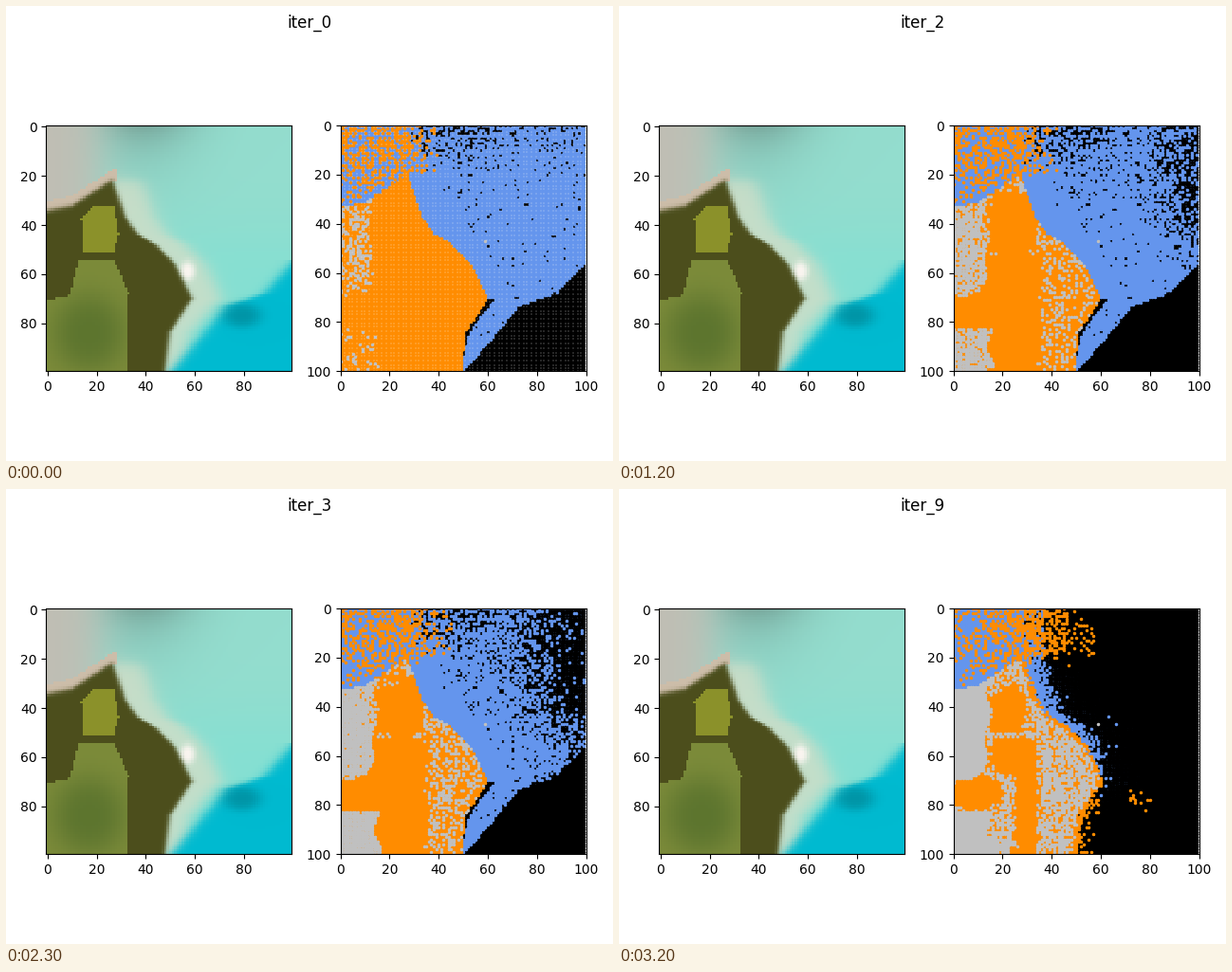
Write a matplotlib script that moves like this. It is 640x480 px and loops after 3300 ms.

```python
import numpy as np
import matplotlib.pyplot as plt
from matplotlib.animation import FuncAnimation
from matplotlib.path import Path

W, H, SIDE = 640, 480, 259.05
COUNT = 33
ORDER = sorted(range(COUNT), key=str)  # iterations play in alphabetical order
COLORS = ["black", "cornflowerblue", "darkorange", "silver"]
BLACK, BLUE, ORANGE, SILVER = range(4)

Y, X = np.mgrid[0:100, 0:100].astype(float)
rng = np.random.default_rng(7)
R1, R2, R3, R4 = rng.random((4, 100, 100))
SPOTS_X, SPOTS_Y = rng.normal((77, 79), (5, 3), (12, 2)).astype(int).T


def through(t, *points):
    return np.interp(t, *zip(*points))


def ease(t):
    t = np.clip(t, 0, 1)
    return t * t * (3 - 2 * t)


def sigmoid(v):
    return 1 / (1 + np.exp(-np.clip(v, -40, 40)))


def blob(cx, cy, rx, ry):
    return np.exp(-(((X - cx) / rx) ** 2 + ((Y - cy) / ry) ** 2) ** 1.5)


# Distance past the shoreline, above the land and into the deep water
EAST = X - through(Y, (20, 27), (37, 33), (44, 38), (48, 45), (56, 53),
                   (70, 60), (84, 51), (100, 49))
NORTH = through(X, (0, 33), (10, 31), (27, 20)) - Y
OFFSHORE = X - through(Y, (55, 100), (68, 88), (73, 73), (86, 62), (100, 50))
OFFSHORE[Y < 55] = -20
LAND = (NORTH < 0) & (EAST < 0)
SURF = (NORTH >= 0) & (X < 29)


def land_score():
    """How long each land cell stays orange."""
    fields = [0.75 * blob(21, 41, 8, 10), blob(25, 59, 9, 8),
              0.85 * blob(9, 75, 10, 6), 0.6 * blob(30, 82, 5, 22)]
    trees = (X > 33) | (NORTH > -8) | (abs(Y - 52) < 2)
    base = np.where(trees, 0.3, 0.36)
    grain = np.where(trees, 0.5, 0.2)
    wobble = 1.5 * np.sin(Y / 3)
    meadow = (X < 14 - 0.2 * np.clip(Y - 50, 0, None) + wobble) & (Y < 70)
    corner = (X < 15 + wobble) & (Y > 82)
    base[meadow], grain[meadow] = 0.08, 0.35
    base[corner] = 0.12
    return base + 0.55 * np.max(fields, axis=0) + (R1 - 0.5) * grain


SCORE = land_score()


def sea_labels(n, late):
    reach = 110 * np.exp(-0.29 * n)
    width = 1.5 + 8 * np.exp(-(n / 6) ** 4)
    depth = 9 + 3 * n
    east = EAST + 0.3 * np.clip(Y - 45, 0, None)
    grain = np.exp(-Y / depth) * (0.2 + 0.4 * np.exp(-((X - 46) / 16) ** 2)) + 0.03
    dark = np.maximum(grain, sigmoid((east - reach) / width))
    dark *= 1 - sigmoid(0.5 * min(reach, 30) - east) * np.clip((Y - 10) / 10, 0, 1)
    out = np.where(R1 < dark, BLACK, BLUE)
    out[OFFSHORE > 0] = BLACK
    out[(Y > 70) & (EAST < np.clip((95 - Y) / 8, 0, 3))] = BLACK

    # the beach turns orange late
    sand = 14.5 * late - 4 * ease((Y - 42) / 12) * late
    sand = np.minimum(sand, 3 + 0.35 * (100 - Y))
    out[(EAST < sand + 3 * (R2 - 0.5)) & (Y > 15) & (late > 0)] = ORANGE

    # speckles by the upper edge and the southern shore
    edge = 42 + 19 * ease(n / 9) - 12 * late
    gain = 0.35 + 0.05 * n + 1.3 * late
    share = gain * np.clip((edge - X) / (edge - 28), 0, 1) ** 1.3
    out[R3 < share * np.clip((24 - Y) / 8, 0, 1)] = ORANGE
    if 6 <= n <= 21:
        out[(Y > 76) & (R4 < 0.5 - EAST / 16)] = ORANGE
    out[(X > 40) & (X < 60) & (R4 < 0.12 * late * (1 - Y / 18))] = SILVER
    if n >= 6:
        out[SPOTS_Y, SPOTS_X] = SILVER if late > 0.8 else ORANGE
    return out


def labels(n):
    late = ease((n - 15) / 9)
    out = sea_labels(n, late)

    blue = 0.55 + 0.25 * ease(n / 10) - 0.2 * late - X * (0.002 + 0.0012 * n)
    blue = blue + 0.3 * sigmoid((Y - 22) / 2) * (1 - ease((n - 6) / 8)) - 0.02 * Y * late
    surf = np.where(R2 < blue, BLUE, ORANGE)
    surf[R4 < 0.14 * late] = SILVER
    out[SURF] = surf[SURF]

    limit = 0.05 + 0.43 * (1 - np.exp(-n / 5)) + 0.32 * late
    out[LAND] = np.where(SCORE > limit, ORANGE, SILVER)[LAND]
    rim = (abs(EAST) < 1.5) & (NORTH < 0)
    if 4 < n < 22:
        out[rim & (R3 < 0.7)] = ORANGE
    elif n >= 22:
        out[rim & (abs(Y - 60) < 15) & (R3 < 0.4)] = BLACK
    out[44, 63] = out[47, 66] = BLUE
    out[47, 59] = SILVER
    return out


def coast_view():
    """Flat shapes and soft gradients seen from above."""
    img = np.full((100, 100, 3), (148.0, 221.0, 206.0))

    def paint(color, mask):
        mask = np.asarray(mask, float)[..., None]
        img[:] = img * (1 - mask) + np.array(color) * mask

    def inside(*points):
        cells = np.column_stack([X.ravel(), Y.ravel()])
        return Path(points).contains_points(cells).reshape(X.shape)

    paint((122, 226, 214), 0.6 * sigmoid((Y - 45) / 8))
    paint((110, 150, 140), 0.75 * np.exp(-Y / 12 - ((X - 38) / 22) ** 2))
    paint((192, 190, 180), sigmoid((22 - X) / 5) * (Y < 36))
    beach = sigmoid((11 - EAST - 0.2 * np.clip(Y - 66, 0, 20)) / 2)
    paint((207, 222, 200), 0.85 * beach * sigmoid((Y - 22) / 1.5) * (EAST > -4))
    paint((0, 186, 208), sigmoid(OFFSHORE / 1.5))
    paint((0, 120, 135), 0.55 * blob(79, 77, 8, 5))
    paint((250, 245, 240), blob(57, 59, 3, 4))
    paint((205, 190, 170), (abs(NORTH) < 2.5) & (X < 29))
    paint((76, 78, 28), sigmoid((-EAST - 1.2) / 0.5) * sigmoid((-NORTH - 1.5) / 0.5))
    farm = inside((-1, 71), (9, 69), (13, 54), (27, 54), (33, 68), (32, 101), (-1, 101))
    paint((124, 139, 58), farm)
    paint((80, 108, 42), 0.7 * farm * blob(17, 84, 15, 16))
    paint((139, 145, 42), inside((14, 38), (20, 32), (27, 32), (29, 44), (27, 51), (15, 51)))
    return img.astype(np.uint8)


fig = plt.figure(figsize=(W / 100, H / 100), dpi=100, facecolor="white")


def panel(left):
    return fig.add_axes([left / W, 94.8 / H, SIDE / W, SIDE / H])


photo, chart = panel(42.4), panel(352.65)
photo.imshow(coast_view(), interpolation="nearest", aspect="auto")
photo.set(xticks=range(0, 100, 20), yticks=range(0, 100, 20))
chart.set(xlim=(0, 100), ylim=(100, 0),
          xticks=range(0, 101, 20), yticks=range(0, 101, 20))
title = fig.suptitle("iter_0", y=0.982)

MAPS = [labels(n) for n in range(COUNT)]
LAYERS = 3  # earlier points stay underneath the newest ones
dots = [[chart.plot([], [], "o", color=c, ms=1, mew=1.5)[0] for c in COLORS]
        for _ in range(LAYERS)]


def update(frame):
    n = ORDER[frame]
    title.set_text(f"iter_{n}")
    for age, layer in zip(reversed(range(LAYERS)), dots):
        for k, line in enumerate(layer):
            ys, xs = np.nonzero(MAPS[n - age] == k) if n >= age else ([], [])
            line.set_data(xs, ys)
    return [title] + sum(dots, [])


anim = FuncAnimation(fig, update, frames=COUNT, interval=100,
                     repeat=True, repeat_delay=0, blit=False)
plt.show()
```
